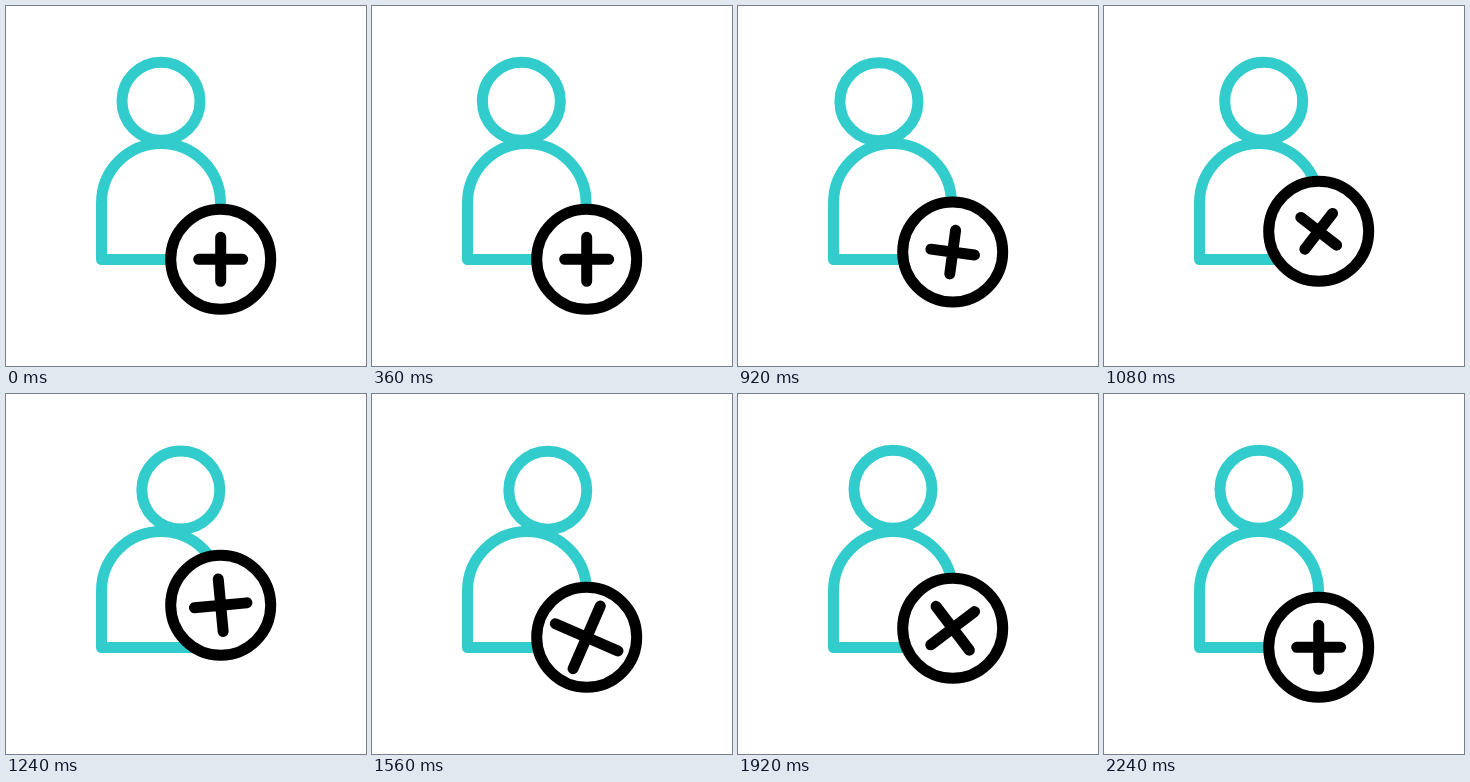
An HTML page for the animation above (2400 ms loop, 360 by 360 pixels).

```html
<!DOCTYPE html>
<html lang="en">
<head>
<meta charset="utf-8">
<title>Add user</title>
<style>
  html, body { margin: 0; height: 100%; overflow: hidden; background: #fff; }
  svg { display: block; width: 100%; height: 100%; }
  g { fill: none; stroke-width: 11; stroke-linecap: round; stroke-linejoin: round; }
</style>
</head>
<body>
<svg viewBox="0 0 360 360">
  <g stroke="#33cccc">
    <path id="body"/>
    <circle id="head" r="39"/>
  </g>
  <g id="badge" stroke="#000">
    <circle r="50" fill="#fff"/>
    <path id="plus"/>
  </g>
</svg>
<script>
  const LOOP = 2400;
  const [body, head, badge, plus] =
    ['body', 'head', 'badge', 'plus'].map(id => document.getElementById(id));

  // Keyframes are [time, value] pairs, eased in and out between neighbours.
  const HEAD_X = [[200, 0], [660, -20], [805, -20], [1290, 21], [1540, 21], [1900, 0]];
  const BADGE_Y = [[800, 0], [1260, -42.2], [1700, 0], [1950, -19.8], [2200, 0]];
  const ARM = [[1000, 22], [1600, 34.3], [2200, 22]];
  const TURN = [[800, 0], [2200, 360]];

  function at(keys, t) {
    const i = keys.findIndex(k => k[0] > t);
    if (i < 0) return keys[keys.length - 1][1];
    if (i === 0) return keys[0][1];
    const [t0, a] = keys[i - 1], [t1, b] = keys[i];
    const u = (t - t0) / (t1 - t0);
    return a + (b - a) * u * u * (3 - 2 * u);
  }

  function draw(t) {
    const dx = at(HEAD_X, t);
    head.setAttribute('cx', 155 + dx);
    head.setAttribute('cy', 95.2 + dx * dx / 450);

    // The right shoulder gives a little when the head leans left.
    const right = 214.5 + Math.min(0, dx) * 0.075;
    body.setAttribute('d',
      `M95.5 253.5V197A${(right - 95.5) / 2} 59.5 0 0 1 ${right} 197V253.5Z`);

    const arm = at(ARM, t);
    badge.setAttribute('transform', `translate(214.7 ${253.3 + at(BADGE_Y, t)})`);
    plus.setAttribute('d', `M${-arm} 0H${arm}M0 ${-arm}V${arm}`);
    plus.setAttribute('transform', `rotate(${at(TURN, t)})`);
  }

  const start = performance.now();
  function frame() {
    draw((performance.now() - start) % LOOP);
    requestAnimationFrame(frame);
  }
  frame();
</script>
</body>
</html>
```
